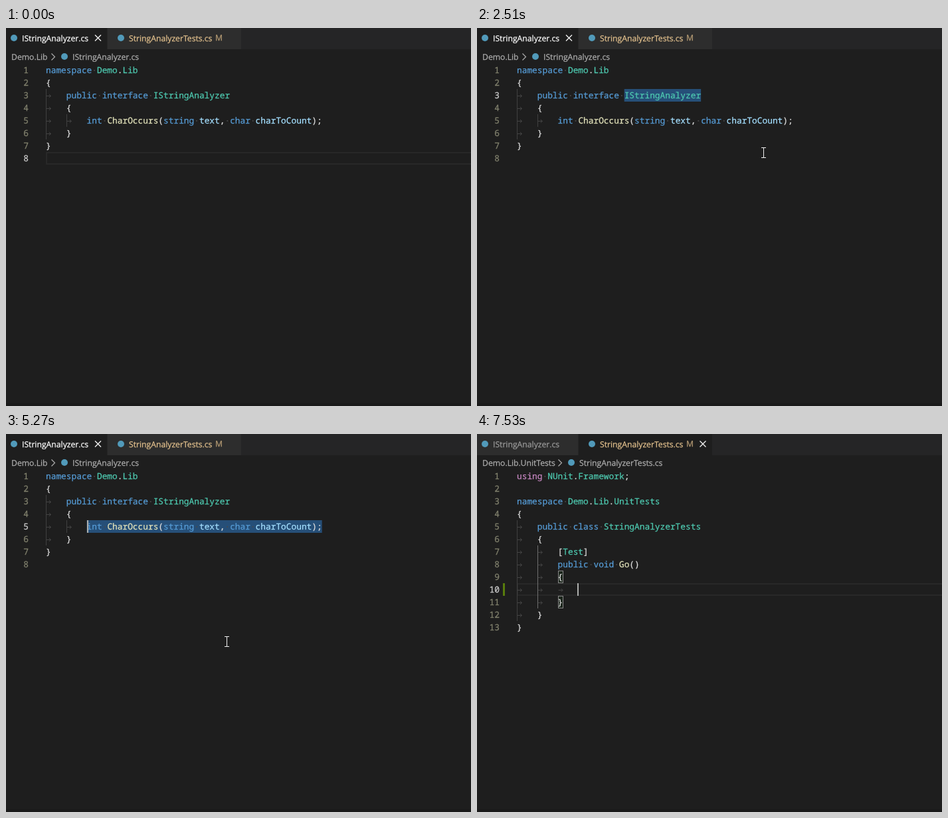
Recreate the animation shown at these times as an HTML page. Size 700 by 570 pixels, loop 8 s.

```html
<!DOCTYPE html>
<html lang="en">
<head>
<meta charset="utf-8">
<title>Code editor</title>
<style>
html, body { margin: 0; width: 100%; height: 100%; overflow: hidden; background: #1e1e1e; }
svg { display: block; width: 700px; height: 570px; }
text { text-rendering: geometricPrecision; white-space: pre; stroke-width: .25; }
.code { font: 12.83px "Noto Sans Mono", "DejaVu Sans Mono", monospace; }
.ui { font: 12.2px "Open Sans", "Noto Sans", sans-serif; }
</style>
</head>
<body>
<svg id="stage" viewBox="0 0 700 570"></svg>
<script>
const LOOP = 8000, STEP = 125.6;
const LEFT = 60, TOP = 54, ROW = 19, CHAR = 7.698;
const stage = document.getElementById('stage');

// Leading tabs indent the code.
const files = [
  {
    name: 'IStringAnalyzer.cs', folder: 'Demo.Lib', folderEnd: 61,
    lines: ['namespace Demo.Lib', '{', '\tpublic interface IStringAnalyzer', '\t{',
      '\t\tint CharOccurs(string text, char charToCount);', '\t}', '}', '']
  },
  {
    name: 'StringAnalyzerTests.cs', folder: 'Demo.Lib.UnitTests', folderEnd: 115,
    lines: ['using NUnit.Framework;', '', 'namespace Demo.Lib.UnitTests', '{',
      '\tpublic class StringAnalyzerTests', '\t{', '\t\t[Test]', '\t\tpublic void Go()',
      '\t\t{', '\t\t\t', '\t\t}', '\t}', '}']
  }
];

const palette = [
  [/^using$/, '#c586c0'],
  [/^(namespace|public|interface|class|int|string|char|void)$/, '#569cd6'],
  [/^(CharOccurs|Go)$/, '#e2e2ba'],
  [/^(text|charToCount)$/, '#a4dfff'],
  [/^\w+$/, '#4ec9b0'],
  [/./, '#dcdcdc']
];

const SHOW = 2, HOVER = 48, OPEN = 52, LEAVE = 60;
const drags = [
  { row: 2, press: 9, lit: 11, release: 17, from: 21, end: 36 },
  { row: 4, press: 25, lit: 29, release: 35, from: 8, end: 54 }
];
const moves = [
  { from: 2, to: 6, x: 367, y: 114 },
  { from: 8, to: 10, x: 342, y: 103 },
  { from: 10, to: 13.5, x: 223, y: 104 },
  { from: 17, to: 20, x: 431, y: 188 },
  { from: 21, to: 25, x: 489, y: 138 },
  { from: 27, to: 28, x: 452, y: 136 },
  { from: 28, to: 29, x: 198, y: 136 },
  { from: 29, to: 35, x: 119, y: 132 },
  { from: 35, to: 37, x: 332, y: 313 },
  { from: 45, to: 49, x: 251, y: 24 },
  { from: 53, to: 58, x: 684, y: 515 },
  { from: 58, to: 59, x: 684, y: 540 }
];

const clamp = (v, lo, hi) => Math.min(hi, Math.max(lo, v));
const easeOut = u => 1 - (1 - u) ** 2;
const blink = (n, from) => Math.floor((n - from) / 4) % 2 === 0;
const xAt = col => LEFT + col * CHAR;
const yAt = row => TOP + row * ROW;
const tabsOf = line => line.match(/^\t*/)[0].length;

function pointerAt(n) {
  let x = 626, y = 506;
  for (const move of moves) {
    const u = easeOut(clamp((n - move.from) / (move.to - move.from), 0, 1));
    x += (move.x - x) * u;
    y += (move.y - y) * u;
  }
  return [x, y];
}

// The selection trails the pointer slightly.
function dragColumn(drag, n) {
  const [x] = pointerAt(Math.min(n, drag.release) - .2);
  return clamp(Math.floor((x - LEFT) / CHAR), drag.from, drag.end);
}

const rect = (x, y, w, h, fill, extra = '') =>
  `<rect x="${x}" y="${y}" width="${w}" height="${h}" fill="${fill}" ${extra}/>`;
const label = (kind, x, y, text, color, extra = '') =>
  `<text class="${kind}" x="${x}" y="${y}" fill="${color}" stroke="${color}" ${extra}>${text}</text>`;
const stroke = (d, color, width = 1) =>
  `<path d="${d}" fill="none" stroke="${color}" stroke-width="${width}"/>`;
const icon = (x, y) => `<circle cx="${x}" cy="${y}" r="5" fill="#519aba"/>`;
const cross = (x, color) =>
  stroke(`M${x - 4.5} 10.5l9 9M${x - 4.5} 19.5l9-9`, color, 1.4);

function codeLine(line, row) {
  const tabs = tabsOf(line), y = yAt(row);
  let out = '';
  for (let i = 0; i < tabs; i++) {
    out += stroke(`M${xAt(i * 4) + 1} ${y + 10.5}h6.5m-2.5-2.5l2.5 2.5-2.5 2.5`, '#444');
  }
  for (const m of line.slice(tabs).matchAll(/\w+| |[^\w ]+/g)) {
    const x = xAt(tabs * 4 + m.index);
    out += m[0] === ' '
      ? `<circle cx="${x + CHAR / 2}" cy="${y + 10}" r="1" fill="#4a4a4a"/>`
      : label('code', x, y + 14, m[0], palette.find(p => p[0].test(m[0]))[1]);
  }
  return out;
}

function guides(lines, active) {
  return lines.map((line, row) => [0, 1].slice(0, tabsOf(line)).map(level =>
    rect(Math.round(xAt(level * 4)), yAt(row), 1, ROW, level && active ? '#707070' : '#404040')
  ).join('')).join('');
}

function brackets(lines, row) {
  const depth = tabsOf(lines[row]) - 1;
  const open = lines.lastIndexOf('\t'.repeat(depth) + '{', row);
  const close = lines.indexOf('\t'.repeat(depth) + '}', row);
  return [open, close].map(r =>
    rect(Math.round(xAt(depth * 4)) + .5, yAt(r) + .5, 7, ROW - 1, '#1b251b', 'stroke="#888"')
  ).join('');
}

function header(active, hover) {
  const file = files[active], end = file.folderEnd;
  const bg = i => i === active ? '#1e1e1e' : '#2d2d2d';
  return rect(0, 0, 700, 32, '#252526') + rect(0, 0, 152, 32, bg(0)) + rect(153, 0, 201, 32, bg(1)) +
    icon(12, 15) + label('ui', 24, 20, files[0].name, active ? '#9a9a9a' : '#fff') +
    icon(173, 15) + label('ui', 185, 20, files[1].name, '#e2c08d') +
    label('ui', 315, 19, 'M', '#b89d75') +
    (active ? '' : cross(138.5, '#f0f0f0')) +
    (active || hover ? cross(340, active ? '#f0f0f0' : '#969696') : '') +
    label('ui', 8, 48, file.folder, '#adadad') +
    stroke(`M${end + 7.5} 38.5l5 5-5 5`, '#adadad', 1.2) +
    icon(end + 27, 43) + label('ui', end + 39, 48, file.name, '#adadad');
}

function pointer(n, held) {
  if (n < SHOW || n >= LEAVE) return '';
  const [x, y] = pointerAt(n).map(Math.round);
  const halo = held
    ? `<circle cx="${x - 2}" cy="${y}" r="12" fill="#b5a516" opacity=".85"/>` : '';
  const shape = y < 34
    ? '<path d="M-3.5-8.5a1.5 1.5 0 0 1 3 0v5l2 .3 2.2.6 2 .8q2 .8 2 2.8v3q0 3-1.5 5v3h-7v-2q-2-2-3.5-5l-2.5-3.5q-.5-2 1.5-2.3l1.8 2z" fill="#fff" stroke="#111" stroke-width=".8"/>'
    : stroke('M-3-7.5H4M-3 7.5H4M.5-7V7', '#f0f0f0');
  return `${halo}<g transform="translate(${x} ${y})">${shape}</g>`;
}

function draw(n) {
  const active = n >= OPEN ? 1 : 0, { lines } = files[active];
  const drag = active ? undefined : drags.findLast(d => n >= d.press);
  const held = drag && n <= drag.release;
  const row = active ? 9 : drag ? drag.row : 7;
  const col = active ? 12 : drag ? dragColumn(drag, n) : 0;
  const lit = active || (drag && n > drag.press && n <= drag.lit);
  const caret = active ? blink(n, OPEN) : drag && (held || !blink(n, drag.release + 1));
  let out = rect(0, 0, 700, 570, '#1e1e1e') + rect(0, 566, 700, 4, '#1a1a1a') + header(active, n >= HOVER);

  if (drag && col < drag.end) out += rect(xAt(col), yAt(row), (drag.end - col) * CHAR, ROW, '#264f78');
  else out += rect(61, yAt(row) + 1, 660, ROW - 2, 'none', 'stroke="#282828" stroke-width="2"');

  out += guides(lines, active) + (lit ? brackets(lines, row) : '');
  lines.forEach((line, i) => {
    const color = i === row ? '#d0d0d0' : '#82826e';
    out += label('code', 34, yAt(i) + 14, i + 1, color, 'text-anchor="end"') + codeLine(line, i);
  });
  if (n >= OPEN + 4) out += rect(39, yAt(row), 3, ROW, '#587c0c');
  if (caret) out += rect(Math.round(xAt(col)) - active, yAt(row), 2, ROW, '#aeafad');
  stage.innerHTML = out + pointer(n, held);
}

const start = performance.now();
let shown = -1;
function tick() {
  const t = (performance.now() - start) % LOOP;
  const n = Math.floor((t + 12) / STEP);
  if (n !== shown) draw(shown = n);
  requestAnimationFrame(tick);
}
tick();
</script>
</body>
</html>
```
